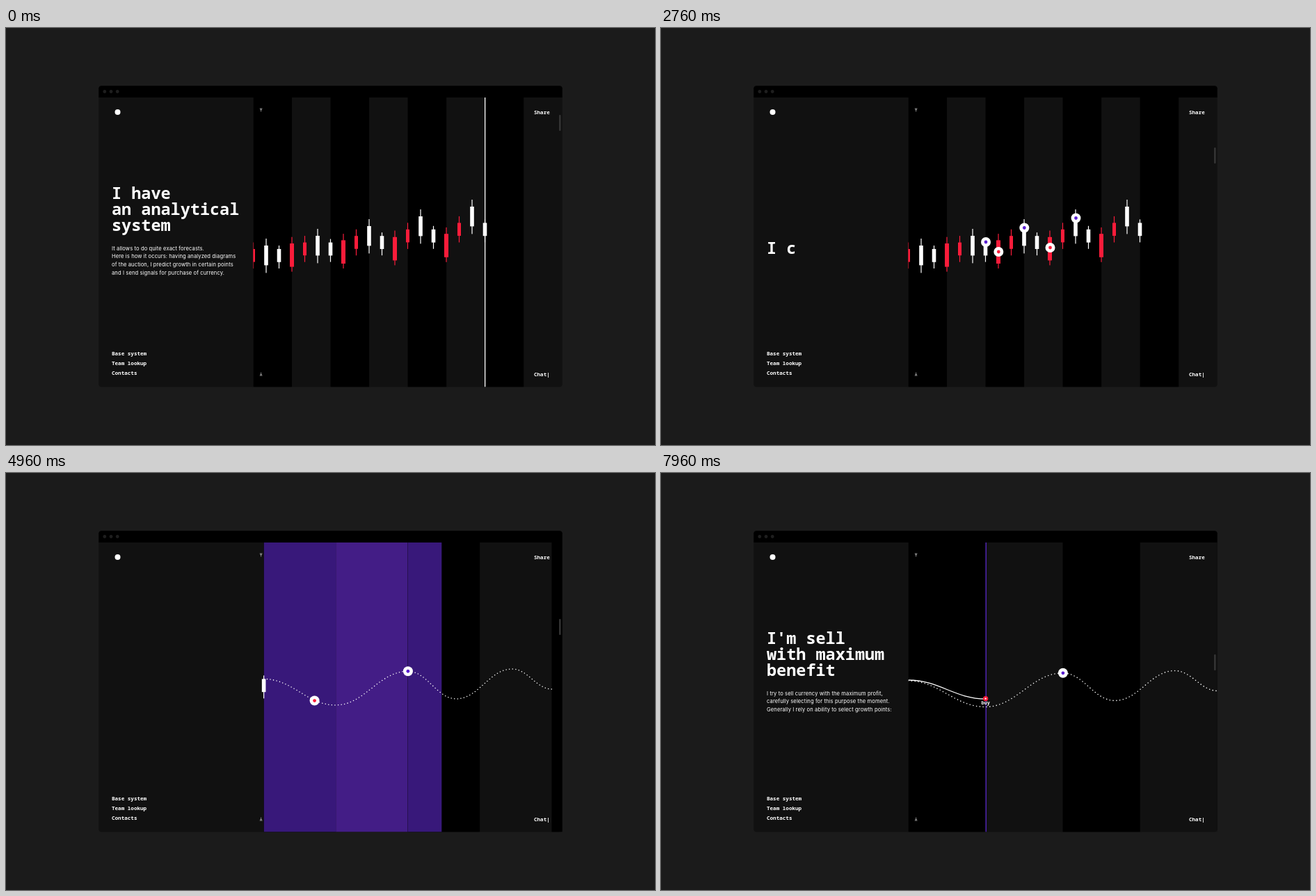
Write an HTML page with a canvas that moves like this. It is 933 px wide and 600 px high and loops after 8 s.

```html
<!DOCTYPE html>
<html lang="en">
<head>
<meta charset="utf-8">
<title>Analytical system</title>
<style>
  html, body { margin: 0; width: 100%; height: 100%; overflow: hidden; background: #1b1b1b; }
  #stage { position: relative; width: 933px; height: 600px; overflow: hidden; color: #fff; }
  canvas { position: absolute; left: 0; top: 0; }
  .mono { position: absolute; white-space: pre; font: 700 7.6px/14px "Noto Sans Mono", "DejaVu Sans Mono", monospace; }
  #block { position: absolute; left: 152px; top: 0; }
  #head { left: 0; top: 225.5px; font-size: 23.5px; line-height: 23.3px; }
  #para { position: absolute; left: 0; top: 311.6px; white-space: pre; letter-spacing: .1px; font: 400 7.6px/11.65px Inter, "Open Sans", sans-serif; }
  .gone { visibility: hidden; }
</style>
</head>
<body>
<div id="stage">
  <canvas id="view" width="933" height="600"></canvas>
  <div id="block">
    <div id="head" class="mono"><span class="gone"></span><span></span></div>
    <div id="para"><span class="gone"></span><span></span></div>
  </div>
  <div class="mono" style="left:152px;top:461.2px">Base system
Team lookup
Contacts</div>
  <div class="mono" style="left:759px;top:113.7px">Share</div>
  <div class="mono" style="left:759px;top:490.5px">Chat|</div>
  <div class="mono" id="buy" style="left:460.5px;top:323.6px;font-size:6.8px">buy</div>
</div>
<script>
const LOOP = 8000, TOP = 100, BOTTOM = 516.6, LEFT = 355.5, RIGHT = 799.7;
const STRIPE = 55.53, STEP = 18.5, MID = 577.6, SPLIT = 466.6, EDGE = 688.6;
const WHITE = '#fff', RED = '#fb1c3a', VIOLET = '#5a1fd0';

const $ = id => document.getElementById(id);
const g = $('view').getContext('2d');

const prog = (t, a, b) => Math.min(1, Math.max(0, (t - a) / (b - a)));
const ease = u => u < .5 ? 2 * u * u : 1 - 2 * (1 - u) ** 2;
const glide = (t, a, b) => ease(prog(t, a, b));
const mix = (a, b, u) => a + (b - a) * u;

// start of typing, start of erasing, heading, paragraph
const sections = [
  [-1000, 2100, 'I have\nan analytical\nsystem',
    'It allows to do quite exact forecasts.\nHere is how it occurs: having analyzed diagrams\nof the auction, I predict growth in certain points\nand I send signals for purchase of currency.'],
  [2695, 4400, 'I can make\nan accurate\nforecasts',
    'It is necessary to process a huge number\nof information, but I do not complain).\nOn these data my forecasts are built.\nThey look approximately so:'],
  [5320, 6720, 'Buy currency\nat a good\nprice',
    'According to the final results\nof analytics I select the most relevant signals\nand I make purchases according\nto the following diagram:'],
  [7210, 9000, "I'm sell\nwith maximum\nbenefit",
    'I try to sell currency with the maximum profit,\ncarefully selecting for this purpose the moment.\nGenerally I rely on ability to select growth points:']
];

const scrollKeys = [[0, 125], [980, 125], [1840, 145.5], [1900, 145.5], [2760, 172],
  [4280, 199], [5280, 215], [6840, 237.5], [7960, 261], [8000, 261.5]];

// one period of candles: colour, body top, body height, upper wick, lower wick, width, rise per period
const candles = [
  [RED, 318, 18.6, 9.5, 9.5, 5, 9.4],
  [WHITE, 313, 28.4, 10, 11, 5.6, 14],
  [WHITE, 318, 18.8, 5, 9.2, 5.6, 9.4],
  [RED, 310, 33.6, 9.3, 7, 6, 4.6]
];

// signals in the order they leave
const signals = [[670.5, 285, RED], [652, 283, VIOLET], [633.5, 327, RED], [615, 301.5, VIOLET],
  [541, 317.5, RED], [596.5, 273.5, VIOLET], [559.5, 316, RED], [522.3, 287.5, VIOLET],
  [485.3, 322, RED], [467, 308, VIOLET]];

const wave = [[466.6, 280.5], [522, 318], [577.6, 269.3], [615, 309], [658, 266], [689, 295]];

function box(x, y, w, h, color) {
  g.fillStyle = color;
  g.fillRect(x, y, w, h);
}

function disc(x, y, r, color) {
  g.fillStyle = color;
  g.beginPath();
  g.arc(x, y, r, 0, 7);
  g.fill();
}

function marker(x, y, color, s = 1) {
  if (s <= 0) return;
  disc(x, y, 7 * s, WHITE);
  disc(x, y, 2.4 * s, color);
}

function curve(points) {
  g.beginPath();
  points.forEach(([x, y], i) => {
    if (!i) return g.moveTo(x, y);
    const [px, py] = points[i - 1], d = (x - px) * .4;
    g.bezierCurveTo(px + d, py, x - d, y, x, y);
  });
}

// strokes only the part left of the given x
function strokeTo(points, end, width, dash) {
  g.save();
  g.beginPath();
  g.rect(LEFT, TOP, end - LEFT, BOTTOM - TOP);
  g.clip();
  curve(points);
  g.setLineDash(dash);
  g.lineCap = 'round';
  g.lineWidth = width;
  g.strokeStyle = WHITE;
  g.stroke();
  g.restore();
}

function arrow(y, dir) {
  g.strokeStyle = '#aaa';
  g.lineWidth = .8;
  g.beginPath();
  g.moveTo(364.7, y - 2 * dir);
  g.lineTo(368.5, y - 2 * dir);
  g.moveTo(366.6, y - 2 * dir);
  g.lineTo(366.6, y + 2.4 * dir);
  g.moveTo(365.3, y);
  g.lineTo(366.6, y - 1.3 * dir);
  g.lineTo(367.9, y);
  g.stroke();
}

function drawWindow() {
  box(0, 0, 933, 600, '#1b1b1b');
  g.fillStyle = '#111';
  g.beginPath();
  g.roundRect(133.3, 83.3, 666.4, 433.3, 4);
  g.fill();
  g.fillStyle = '#000';
  g.beginPath();
  g.roundRect(133.3, 83.3, 666.4, 16.7, [4, 4, 0, 0]);
  g.fill();
  for (const x of [141.8, 151, 160.2]) disc(x, 91.5, 2.4, '#1e1e1e');
  disc(160.5, 121, 4, WHITE);
}

// visible violet span in chart coordinates
function tint(t) {
  if (t < 980) return null;
  if (t < 1900) return [mix(EDGE, SPLIT, glide(t, 980, 1840)), EDGE];
  if (t < 2640) return [SPLIT, mix(EDGE, SPLIT, glide(t, 1900, 2640))];
  if (t < 3540) return null;
  if (t < 4620) return [SPLIT, mix(SPLIT, EDGE, glide(t, 3540, 4240))];
  if (t < 5400) return [SPLIT, mix(EDGE, SPLIT, glide(t, 4620, 5400))];
  return null;
}

function drawChart(t) {
  const k = glide(t, 4400, 5160), shift = -12 * STEP * glide(t, 2760, 3480);
  const X = x => MID + (x - MID) * (1 + k);
  const Y = y => y + 18.5 * k;
  const H = BOTTOM - TOP;
  g.save();
  g.beginPath();
  g.rect(LEFT, TOP, RIGHT - LEFT, H);
  g.clip();

  const span = tint(t);
  for (let i = 0; i < 8; i++) {
    const a = LEFT + i * STRIPE, b = a + STRIPE, dark = i % 2 === 0;
    if (dark) box(X(a), TOP, X(b) - X(a), H, '#000');
    if (!span) continue;
    const l = Math.max(a, span[0]), r = Math.min(b, span[1]);
    if (r > l) box(X(l), TOP, X(r) - X(l), H, dark ? '#38187a' : '#431d86');
  }
  if (t > 7900) box(SPLIT - .1, TOP, 1.5 + 8 * prog(t, 7970, 8060), H, '#4e22ae');
  const line = mix(EDGE, SPLIT, glide(t, 980, 1840));
  if (t < 2640) box(line - .6, TOP, 1.3, H, WHITE);

  for (let i = 0; i < 19; i++) {
    const [color, top, h, up, down, w, rise] = candles[i % 4];
    const x = X(LEFT + i * STEP + shift), y = Y(top - rise * Math.floor(i / 4));
    if (x < LEFT - 4 || k === 1) continue;
    box(x - .6, y - up, 1.2, up + h + down, color);
    box(x - w / 2, y, w, h, color);
  }

  if (t < 3500) {
    signals.forEach(([x, y, color], i) => {
      const out = 2110 + 130 * i;
      const s = prog(x + 8 - line, 0, 8) * (1 - prog(t, out, out + 100));
      marker(x + shift, y, color, s);
    });
  }

  if (t > 3560) {
    const end = SPLIT + 222.4 * prog(t, 3560, 4380);
    strokeTo(wave.map(([x, y]) => [X(x), Y(y)]), X(end), mix(1.2, 1.6, k), [0, mix(3.3, 4.8, k)]);
    marker(X(mix(503.5, 506, k)), Y(mix(311, 311.7, k)), RED,
      prog(end, 498, 510) * (1 - prog(t, 6000, 6200)));
    marker(X(MID) + .3, Y(269.3), VIOLET, prog(end, 572, 584));
  }

  if (t > 5980) {
    strokeTo([[LEFT, 298], [SPLIT, 325]], mix(LEFT, SPLIT, glide(t, 5980, 6600)), 1.3, []);
    const s = prog(t, 6540, 6640);
    disc(SPLIT, 324.6, 3.7 * s, RED);
    disc(SPLIT, 324.6, 1.2 * s, WHITE);
  }
  g.restore();
  arrow(118, 1);
  arrow(498, -1);
}

function drawScroll(t) {
  const i = scrollKeys.findIndex(key => key[0] > t);
  const [[t0, y0], [t1, y1]] = [scrollKeys[i - 1], scrollKeys[i]];
  g.fillStyle = '#383838';
  g.beginPath();
  g.roundRect(795.2, mix(y0, y1, prog(t, t0, t1)), 2.3, 23, 1);
  g.fill();
}

function setText(el, text, from, to) {
  const a = Math.floor(from * text.length), b = Math.floor(to * text.length);
  el.children[0].textContent = text.slice(0, a);
  el.children[1].textContent = text.slice(a, b);
}

function drawText(t) {
  const [start, out, head, para] = sections.filter(s => s[0] <= t).pop();
  const gone = prog(t, out, out + 470);
  setText($('head'), head, gone, prog(t, start, start + 600));
  setText($('para'), para, gone, prog(t, start + 300, start + 720));
  const y = 79 * (1 - glide(t, start + 65, start + 350)) - 30 * gone;
  $('block').style.transform = `translateY(${y}px)`;
  $('buy').style.opacity = prog(t, 6540, 6640);
}

function frame(now) {
  const t = now % LOOP;
  drawWindow();
  drawChart(t);
  drawScroll(t);
  drawText(t);
}

const begin = performance.now();
function tick() {
  frame(performance.now() - begin);
  requestAnimationFrame(tick);
}
tick();
</script>
</body>
</html>
```
